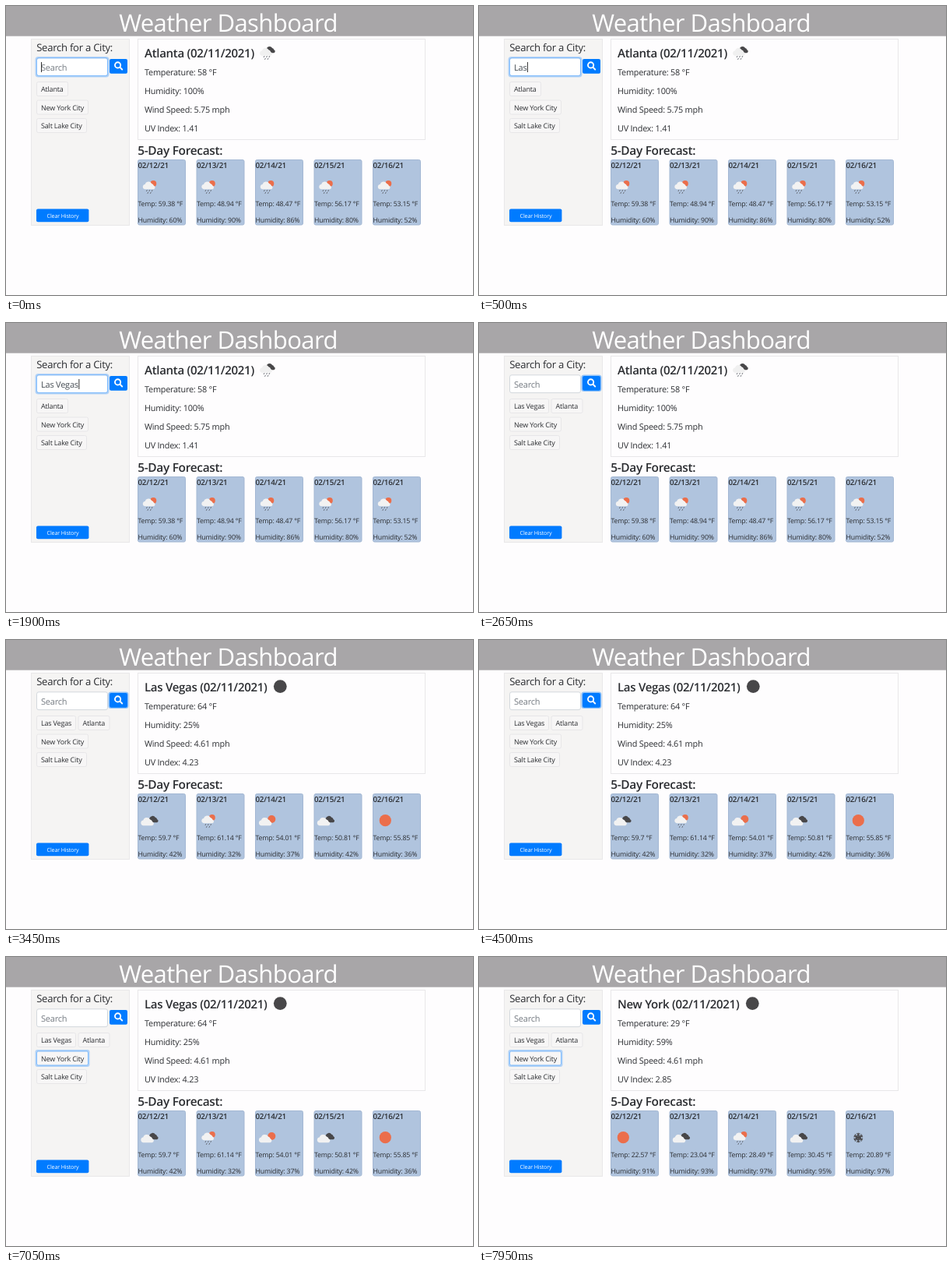
An HTML page that plays this animation: 600x371 px, repeating every 8000 ms.

```html
<!DOCTYPE html>
<html lang="en">
<head>
<meta charset="utf-8">
<title>Weather Dashboard</title>
<style>
  html, body { margin: 0; width: 100%; height: 100%; overflow: hidden; background: #fefdfe; }
  svg { display: block; width: 100%; height: 100%; }
  text {
    font-family: "Open Sans", "Noto Sans", sans-serif;
    letter-spacing: -.02em;
    fill: #2b2d31;
    white-space: pre;
    text-rendering: geometricPrecision;
  }
  .title { font-size: 31.1px; fill: #fff; }
  .label { font-size: 13.1px; }
  .field { font-size: 11px; fill: #495057; }
  .hint { fill: #757b82; }
  .name { font-size: 9px; }
  .chip { fill: #f7f6f6; stroke: #e7e6e8; }
  .clear { font-size: 7.1px; fill: #fff; }
  .city { font-size: 15.05px; font-weight: 600; }
  .week { font-size: 15.45px; font-weight: 600; }
  .fact { font-size: 10.85px; }
  .date { font-size: 9.75px; font-weight: 600; }
  .small { font-size: 8.75px; }
  .card { fill: #b0c4de; stroke: #a3b7d3; }
  .ring { fill: none; stroke: #007bff; stroke-opacity: .28; stroke-width: 2; }
  .edge { fill: none; stroke: #80bdff; }
</style>
</head>
<body>
<svg viewBox="0 0 600 371">
  <defs>
    <path id="cloud" d="M-6.6 5.2A3.4 3.4 0 0 1-6.5-1.5 5 5 0 0 1 2.6-2.6 3.7 3.7 0 0 1 5.4.2 2.6 2.6 0 0 1 5.2 5.2Z"/>
    <g id="drops" stroke="#5d6068" stroke-width="1" stroke-linecap="round">
      <path d="M-4.2 4.6l-.5 1M-.8 4.6l-.5 1M2.6 4.6l-.5 1M-2.8 7.4l-.5 1M.8 7.4l-.5 1"/>
    </g>
    <g id="sun"><circle cy="-.3" r="7.6" fill="#eb6e4b"/></g>
    <g id="moon"><circle cy="-.4" r="8.4" fill="#484749"/></g>
    <g id="sunny">
      <circle cx="5" cy="-2" r="5" fill="#eb6e4b"/>
      <use href="#cloud" x="-2" y="1" fill="#f2f2f2"/>
    </g>
    <g id="cloudy">
      <use href="#cloud" transform="translate(4.4 -2) scale(.82)" fill="#484749"/>
      <use href="#cloud" x="-2.6" y="1" fill="#f2f2f2"/>
    </g>
    <g id="rain">
      <circle cx="4" cy="-4" r="4" fill="#eb6e4b"/>
      <use href="#cloud" transform="translate(-.6 -1.6) scale(.95)" fill="#f2f2f2"/>
      <use href="#drops"/>
    </g>
    <g id="nightrain">
      <use href="#cloud" transform="translate(4 -4) scale(.8)" fill="#484749"/>
      <use href="#cloud" transform="translate(-1 -1.2) scale(.95)" fill="#f0f0f0"/>
      <use href="#drops"/>
    </g>
    <path id="arm" d="M0 0V-6.2M-2-5.6L0-3.8 2-5.6M-1.7-3.2L0-1.6 1.7-3.2" fill="none" stroke="#484749" stroke-width="1.1"/>
    <g id="snow"></g>
  </defs>

  <rect width="600" height="371" fill="#fefdfe"/>
  <rect width="600" height="38.7" fill="#a8a6a8"/>
  <text class="title" x="145.2" y="32.6">Weather Dashboard</text>

  <rect x="32.5" y="42.5" width="126" height="239" fill="#f5f4f3" stroke="#e9e8e9"/>
  <text class="label" x="39.2" y="58.3">Search for a City:</text>

  <rect x="39.5" y="66.8" width="91" height="22.8" rx="2.5" fill="#fff" stroke="#d3d8dd"/>
  <g data-on="0 2200">
    <rect class="ring" x="38.5" y="66" width="93" height="24.4" rx="3"/>
    <rect class="edge" x="39.5" y="66.8" width="91" height="22.8" rx="2.5"/>
  </g>
  <text class="field" id="field" x="45" y="83"></text>
  <rect id="caret" y="72" width="1" height="13" fill="#333"/>

  <rect x="133" y="68" width="23" height="18.8" rx="2" fill="#007bff"/>
  <rect class="ring" data-on="2200 5550" x="132.3" y="67.5" width="24.2" height="19.6" rx="2.5" style="stroke-opacity:.4"/>
  <g fill="none" stroke="#fff" stroke-width="1.9" stroke-linecap="round">
    <circle cx="143.6" cy="75.9" r="3.6"/>
    <path d="M146.4 78.7L149.2 81.5"/>
  </g>

  <g id="chips"></g>
  <rect x="39" y="260.6" width="67.4" height="16.6" rx="2" fill="#007bff"/>
  <text class="clear" x="52.6" y="272.3">Clear History</text>

  <rect x="169.5" y="42.5" width="369" height="129" fill="#fefdfe" stroke="#e8e7e9"/>
  <text class="week" x="169.2" y="191">5-Day Forecast:</text>
  <g id="cards"></g>
  <g id="data"></g>
</svg>
<script>
const LOOP = 8000;
const $ = id => document.getElementById(id);
const text = (cls, x, y, s) => `<text class="${cls}" x="${x}" y="${y}">${s}</text>`;
const icon = (name, x, y) => `<use href="#${name}" x="${x}" y="${y}"/>`;
const shown = (from, to, body) => `<g data-on="${from} ${to}">${body}</g>`;

const box = (cls, x, y, w, h) =>
  `<rect class="${cls}" x="${x}" y="${y}" width="${w}" height="${h}" rx="2"/>`;

// A history button, with an optional span of keyboard focus
function chip(name, x, y, w, focus) {
  const ring = focus
    ? shown(...focus, box("ring", x - .5, y - .5, w + 1, 20) + box("edge", x + .5, y + .5, w - 1, 18))
    : "";
  return box("chip", x + .5, y + .5, w - 1, 18) + ring + text("name", x + 6, y + 13, name);
}

$("chips").innerHTML =
  shown(0, 2550, chip("Atlanta", 39, 97, 41)) +
  shown(2550, LOOP,
    chip("Las Vegas", 39, 97, 51, [5550, 5950]) +
    chip("Atlanta", 92.5, 97, 41, [5950, 6500])) +
  chip("New York City", 39, 120.5, 67, [6500, LOOP]) +
  chip("Salt Lake City", 39, 144, 65);

$("snow").innerHTML = [0, 60, 120, 180, 240, 300]
  .map(a => `<use href="#arm" transform="rotate(${a})"/>`).join("");

const cardX = i => 169 + 75.5 * i;
const days = [0, 1, 2, 3, 4];
$("cards").innerHTML = days.map(i =>
  box("card", cardX(i) + .5, 197.5, 61, 83.5) +
  text("date", cardX(i) + .5, 207.8, `02/${12 + i}/21`)).join("");

const cities = [
  { name: "Atlanta", from: 0, to: 3350, facts: [58, 100, 5.75, 1.41], sky: ["nightrain", 336],
    temps: [59.38, 48.94, 48.47, 56.17, 53.15], humid: [60, 90, 86, 80, 52],
    icons: ["rain", "rain", "rain", "rain", "rain"] },
  { name: "Las Vegas", from: 3350, to: 7800, facts: [64, 25, 4.61, 4.23], sky: ["moon", 352.3],
    temps: [59.7, 61.14, 54.01, 50.81, 55.85], humid: [42, 32, 37, 42, 36],
    icons: ["cloudy", "rain", "sunny", "cloudy", "sun"] },
  { name: "New York", from: 7800, to: LOOP, facts: [29, 59, 4.61, 2.85], sky: ["moon", 351.3],
    temps: [22.57, 23.04, 28.49, 30.45, 20.89], humid: [91, 93, 97, 95, 97],
    icons: ["sun", "cloudy", "rain", "cloudy", "snow"] }
];

// Icons load one step after the text
const ICON_LAG = 50;

function report(c) {
  const [temp, hum, wind, uv] = c.facts;
  const lines = [`Temperature: ${temp} °F`, `Humidity: ${hum}%`, `Wind Speed: ${wind} mph`, `UV Index: ${uv}`];
  const words = text("city", 178, 65.8, `${c.name} (02/11/2021)`) +
    lines.map((s, i) => text("fact", 178, 89 + 23.9 * i, s)).join("") +
    days.map(i =>
      text("small", cardX(i) + .5, 257.2, `Temp: ${c.temps[i]} °F`) +
      text("small", cardX(i) + .5, 277.8, `Humidity: ${c.humid[i]}%`)).join("");
  const pics = icon(c.sky[0], c.sky[1], 60) +
    c.icons.map((n, i) => icon(n, cardX(i) + 16.3, 232)).join("");
  const iconFrom = c.from && c.from + ICON_LAG;
  const iconTo = c.to < LOOP ? c.to + ICON_LAG : LOOP;
  return shown(c.from, c.to, words) + shown(iconFrom, iconTo, pics);
}
$("data").innerHTML = cities.map(report).join("");

const timed = [...document.querySelectorAll("[data-on]")].map(el => {
  const [from, to] = el.dataset.on.split(" ").map(Number);
  return { el, from, to };
});

const QUERY = "Las Vegas";
const keys = [200, 350, 500, 650, 900, 1050, 1200, 1350, 1500];
const BLUR = 2200, SENT = 2550, BLINK = 500;
const field = $("field"), caret = $("caret");

function draw(t) {
  for (const { el, from, to } of timed)
    el.style.display = t >= from && t < to ? "" : "none";

  const typed = t < SENT ? keys.filter(k => k <= t).length : 0;
  const value = typed ? QUERY.slice(0, typed) : "Search";
  if (field.textContent !== value) field.textContent = value;
  field.classList.toggle("hint", !typed);

  const idle = t - (typed ? keys[typed - 1] : 0);
  const lit = t < BLUR && idle % (2 * BLINK) < BLINK;
  caret.style.display = lit ? "" : "none";
  caret.setAttribute("x", 45 + (typed ? field.getComputedTextLength() + .5 : 0));
}

const start = performance.now();
function tick() {
  draw((performance.now() - start) % LOOP);
  requestAnimationFrame(tick);
}
tick();
</script>
</body>
</html>
```
